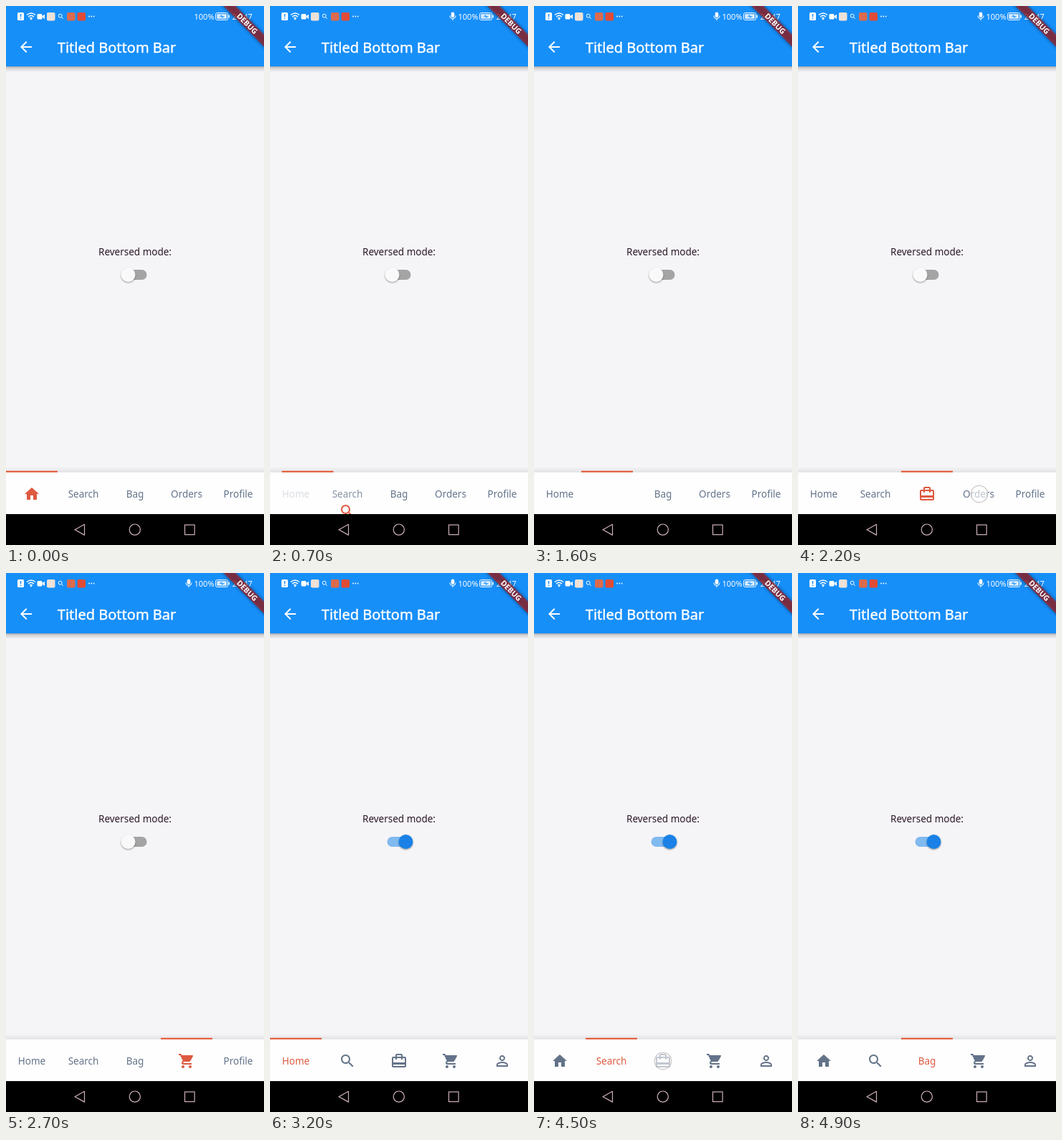
Animation, 360 px wide and 750 px high, one loop 5 s. Source, as an HTML page:

```html
<!DOCTYPE html>
<html lang="en">
<head>
<meta charset="utf-8">
<title>Titled Bottom Bar</title>
<style>
  html, body { margin: 0; width: 100%; height: 100%; overflow: hidden; background: #f5f4f7; }
  svg { display: block; width: 360px; height: 750px; font-family: "Noto Sans", sans-serif; }
</style>
</head>
<body>
<svg viewBox="0 0 360 750" xmlns="http://www.w3.org/2000/svg">
  <defs>
    <linearGradient id="topShade" x2="0" y2="1">
      <stop offset="0" stop-opacity=".32"/>
      <stop offset=".3" stop-opacity=".14"/>
      <stop offset="1" stop-opacity="0"/>
    </linearGradient>
    <linearGradient id="barShade" x2="0" y2="1">
      <stop offset="0" stop-opacity="0"/>
      <stop offset="1" stop-opacity=".075"/>
    </linearGradient>
    <filter id="soft" x="-50%" y="-50%" width="200%" height="200%"><feGaussianBlur stdDeviation="1.3"/></filter>
    <filter id="glow" x="-20%" y="-100%" width="140%" height="300%"><feGaussianBlur stdDeviation="2.4"/></filter>
    <clipPath id="barClip"><rect y="649" width="360" height="58"/></clipPath>
  </defs>

  <rect width="360" height="750" fill="#f5f4f7"/>
  <rect y="84" width="360" height="8" fill="url(#topShade)"/>
  <rect width="360" height="84" fill="#178ff9"/>

  <!-- status bar -->
  <g fill="#fff">
    <rect x="16" y="9" width="9" height="11" rx="1.5"/>
    <path d="M19.8 11h1.5v4.3h-1.5zM19.8 16.5h1.5V18h-1.5z" fill="#178ff9"/>
    <g fill="none" stroke="#fff" stroke-width="1.3">
      <path d="M29 12.5Q35 7.5 41 12.5M31 15Q35 11.5 39 15M33 17.3Q35 15.7 37 17.3"/>
      <circle cx="75.7" cy="13.7" r="2.5" stroke-width="1"/>
      <path d="M77.5 15.5l2.3 2.3" stroke-width="1"/>
    </g>
    <circle cx="35" cy="18.5" r="1"/>
    <rect x="43.5" y="11" width="7" height="7.5" rx="1.5"/>
    <path d="M50.5 14l3.5-2.3v6.2l-3.5-2.3z"/>
    <rect x="57" y="9" width="11.5" height="11.5" rx="2" fill="#f0e2d8"/>
    <rect x="85" y="9" width="11.5" height="11.5" rx="2" fill="#dc6a4c"/>
    <rect x="99.5" y="9" width="11.5" height="11.5" rx="2" fill="#e14c37"/>
    <circle cx="116" cy="14.5" r=".9"/><circle cx="119.3" cy="14.5" r=".9"/><circle cx="122.6" cy="14.5" r=".9"/>
    <g id="mic">
      <rect x="252.7" y="8.5" width="4.6" height="7.5" rx="2.3"/>
      <path d="M251 13.5a4 4 0 0 0 8 0M255 17.5V20" fill="none" stroke="#fff" stroke-width="1.1"/>
    </g>
    <text x="262.5" y="18.7" font-size="11">100%</text>
    <rect x="292.6" y="9.6" width="17" height="9.8" rx="2" fill="none" stroke="#fff"/>
    <rect x="294.3" y="11.3" width="13.6" height="6.4" rx="1" opacity=".85"/>
    <path d="M297 14.8l4.5-2.5-.3 2h4l-4.5 2.6.3-2.1z" fill="#178ff9"/>
    <rect x="310.6" y="12.5" width="1.3" height="4"/>
    <text x="315.8" y="18.7" font-size="11">21:47</text>
    <path transform="translate(16 45)" d="M20 11H7.83l5.59-5.59L12 4l-8 8 8 8 1.41-1.41L7.83 13H20z"/>
    <text x="71.8" y="65" font-size="20" stroke="#fff" stroke-width=".4">Titled Bottom Bar</text>
  </g>

  <!-- corner ribbon -->
  <g transform="translate(360 0) rotate(45)">
    <rect x="-45" y="28" width="90" height="12" opacity=".5" filter="url(#glow)"/>
    <rect x="-45" y="28" width="90" height="12" fill="#b71c1c" opacity=".63"/>
    <text x=".7" y="37.7" font-size="10.4" font-weight="800" fill="#fff" text-anchor="middle">DEBUG</text>
  </g>

  <text x="180" y="347" font-size="13.5" fill="#2b1a26" text-anchor="middle">Reversed mode:</text>
  <rect id="track" x="163.5" y="367" width="33" height="14" rx="7"/>
  <circle id="ink" r="20"/>
  <circle id="shade" cy="375.3" r="10" opacity=".35" filter="url(#soft)"/>
  <circle id="thumb" cy="374" r="10"/>

  <!-- bottom bar -->
  <rect y="641" width="360" height="8" fill="url(#barShade)"/>
  <rect y="649" width="360" height="58" fill="#fefefe"/>
  <g id="tabs" clip-path="url(#barClip)" font-size="13.5" text-anchor="middle"></g>
  <rect id="mark" y="646.8" width="72" height="2.2" fill="#e4603f"/>

  <rect y="707" width="360" height="43" fill="#000"/>
  <g fill="none" stroke="#cdb0b8" stroke-width="1.2">
    <path d="M109.5 721.3v14.8L96 728.7z" stroke-linejoin="round"/>
    <circle cx="179.8" cy="728.6" r="7.6"/>
    <rect x="249.5" y="722" width="13.6" height="13.6"/>
  </g>
  <circle id="touch" r="11.7" fill="#fff" fill-opacity=".6" stroke="#c9c6c6" stroke-opacity=".85" stroke-width="1.4"/>
</svg>

<script>
const LOOP = 5000, SLIDE = 270, FLIP = 2900;
const ACTIVE = '#de5a40', IDLE = '#647389';
const $ = id => document.getElementById(id);

const items = [
  ['Home', 'M10 20v-6h4v6h5v-8h3L12 3 2 12h3v8z'],
  ['Search', 'M15.5 14h-.79l-.28-.27C15.41 12.59 16 11.11 16 9.5 16 5.91 13.09 3 9.5 3S3 5.91 3 9.5 5.91 16 9.5 16c1.61 0 3.09-.59 4.23-1.57l.27.28v.79l5 4.99L20.49 19l-4.99-5zm-6 0C7.01 14 5 11.99 5 9.5S7.01 5 9.5 5 14 7.01 14 9.5 11.99 14 9.5 14z'],
  ['Bag', 'M20 6h-3V4c0-1.11-.89-2-2-2H9c-1.11 0-2 .89-2 2v2H4c-1.11 0-2 .89-2 2v11c0 1.11.89 2 2 2h16c1.11 0 2-.89 2-2V8c0-1.11-.89-2-2-2zM9 4h6v2H9V4zm11 15H4v-2h16v2zm0-5H4V8h3v2h2V8h6v2h2V8h3v6z'],
  ['Orders', 'M7 18c-1.1 0-1.99.9-1.99 2S5.9 22 7 22s2-.9 2-2-.9-2-2-2zM1 2v2h2l3.6 7.59-1.35 2.45c-.16.28-.25.61-.25.96 0 1.1.9 2 2 2h12v-2H7.42c-.14 0-.25-.11-.25-.25l.03-.12.9-1.63h7.45c.75 0 1.41-.41 1.75-1.03l3.58-6.49c.08-.14.12-.31.12-.48 0-.55-.45-1-1-1H5.21l-.94-2H1zm16 16c-1.1 0-1.99.9-1.99 2s.89 2 1.99 2 2-.9 2-2-.9-2-2-2z'],
  ['Profile', 'M12 5.9c1.16 0 2.1.94 2.1 2.1s-.94 2.1-2.1 2.1S9.9 9.16 9.9 8s.94-2.1 2.1-2.1m0 9c2.97 0 6.1 1.46 6.1 2.1v1.1H5.9V17c0-.64 3.13-2.1 6.1-2.1M12 4C9.79 4 8 5.79 8 8s1.79 4 4 4 4-1.79 4-4-1.79-4-4-4zm0 9c-2.67 0-8 1.34-8 4v3h16v-3c0-2.66-5.33-4-8-4z']
];

// start of slide, from tab, to tab
const moves = [[500, 0, 1], [1480, 1, 2], [2300, 2, 3], [FLIP, 3, 0], [3902, 0, 1], [4575, 1, 2]];
// time, x, y
const taps = [[400, 108, 679], [1400, 180, 679], [2200, 253, 679], [2800, 180, 374], [3800, 108, 679], [4500, 180, 679]];

const clamp = v => Math.min(1, Math.max(0, v));
const mix = (a, b, p) => a + (b - a) * p;
const blend = (a, b, p) => `rgb(${a.map((v, i) => Math.round(mix(v, b[i], p)))})`;
const set = (el, attrs) => { for (const k in attrs) el.setAttribute(k, attrs[k]); };

function bezier(x1, y1, x2, y2) {
  const at = (a, b, s) => 3 * a * s * (1 - s) ** 2 + 3 * b * s * s * (1 - s) + s ** 3;
  return x => {
    if (x <= 0 || x >= 1) return clamp(x);
    let lo = 0, hi = 1;
    for (let i = 0; i < 24; i++) {
      const mid = (lo + hi) / 2;
      if (at(x1, x2, mid) < x) lo = mid; else hi = mid;
    }
    return at(y1, y2, lo);
  };
}
const easeInBack = bezier(.6, -.28, .735, .045);
const easeIn = bezier(.42, 0, 1, 1);

function add(name, attrs) {
  const el = document.createElementNS('http://www.w3.org/2000/svg', name);
  set(el, attrs);
  return $('tabs').appendChild(el);
}
const tabs = items.map(([label, d], i) => {
  const x = 36 + 72 * i;
  const text = add('text', { x, y: 684 });
  text.textContent = label;
  return { x, text, icon: add('path', { d }) };
});

function drawTabs(t, reversed) {
  const [start, from, to] = moves.filter(m => m[0] <= t).pop() || [-SLIDE, 0, 0];
  const p = clamp((t - start) / SLIDE), e = easeInBack(p);
  $('mark').setAttribute('x', 72 * mix(from, to, e));

  tabs.forEach(({ x, text, icon }, i) => {
    const pick = q => i === to ? (from === to ? 1 : q) : i === from ? 1 - q : 0;
    const away = 1 - pick(p), fade = clamp(1 - pick(e));
    const textDy = reversed ? away * 112 : 0, iconDy = reversed ? 0 : away * 93.6;
    set(text, { transform: `translate(0 ${textDy})`, opacity: reversed ? 1 : fade, fill: reversed ? ACTIVE : IDLE });
    set(icon, { transform: `translate(${x - 12} ${667 + iconDy})`, opacity: reversed ? fade : 1, fill: reversed ? IDLE : ACTIVE });
  });
}

function drawSwitch(t) {
  const p = easeIn(clamp((t - FLIP) / 200)), cx = mix(170.5, 189.5, p);
  set($('thumb'), { cx, fill: blend([250, 249, 250], [26, 130, 230], p) });
  $('shade').setAttribute('cx', cx);
  $('track').setAttribute('fill', blend([165, 164, 165], [128, 186, 238], p));
  const press = clamp((t - 2800) / 100) * clamp((3100 - t) / 150);
  set($('ink'), { cx, cy: 374, fill: blend([0, 0, 0], [26, 130, 230], p), opacity: .12 * press });
}

function draw(t) {
  drawTabs(t, t >= FLIP);
  drawSwitch(t);
  $('mic').setAttribute('opacity', t >= 600 ? 1 : 0);
  const tap = taps.find(([at]) => t >= at && t < at + 180);
  set($('touch'), tap ? { cx: tap[1], cy: tap[2], opacity: 1 } : { opacity: 0 });
}

const origin = performance.now();
function tick() {
  draw((performance.now() - origin) % LOOP);
  requestAnimationFrame(tick);
}
tick();
</script>
</body>
</html>
```
